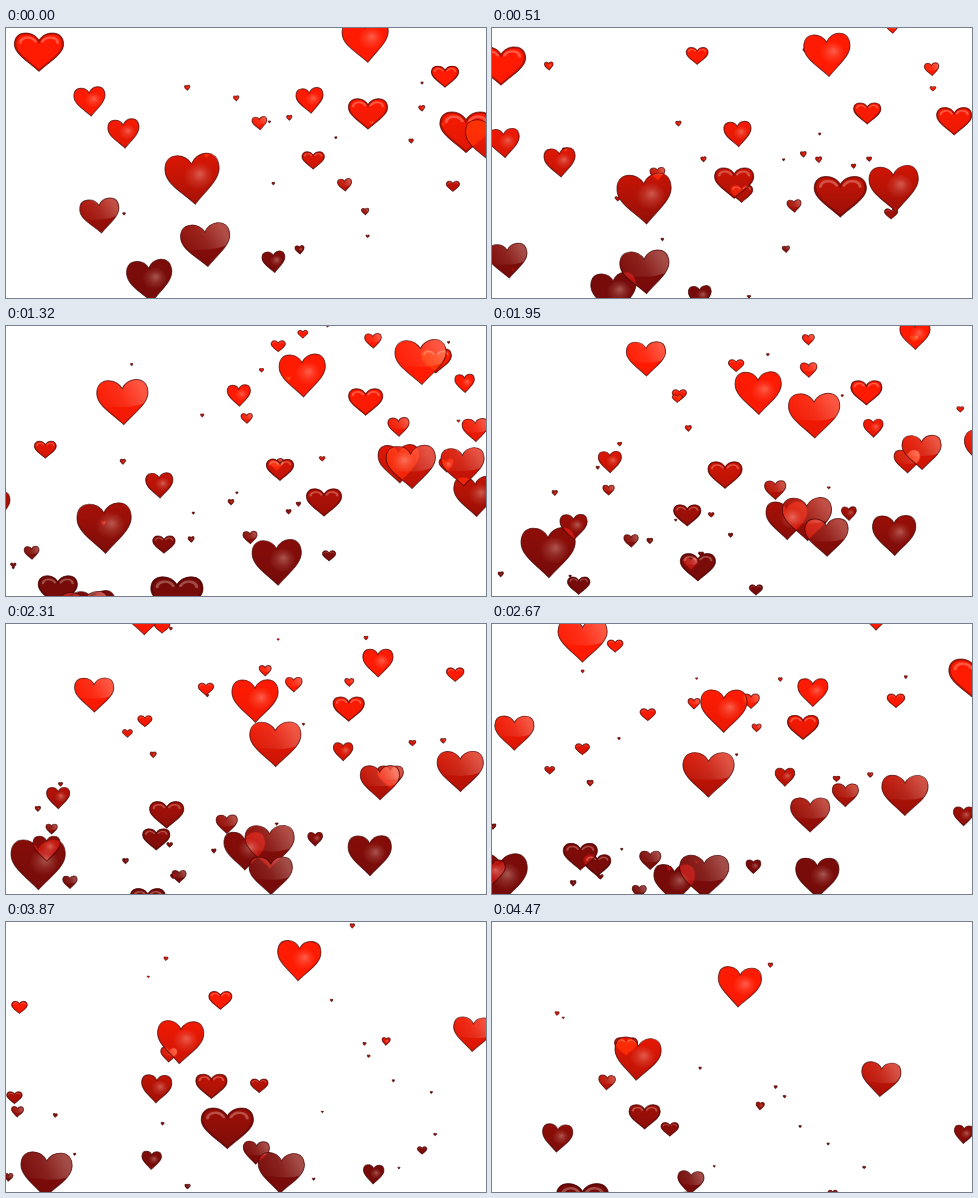
Write an HTML page with a canvas that moves like this. It is 480x270 px and loops after 4.5 s.

```html
<!DOCTYPE html>
<html lang="en">
<head>
<meta charset="utf-8">
<title>Falling hearts</title>
<style>
html, body { margin: 0; width: 100%; height: 100%; overflow: hidden; background: #fff; }
canvas { display: block; width: 480px; height: 270px; }
</style>
</head>
<body>
<canvas id="stage" width="480" height="270"></canvas>
<script>
const W = 480, H = 270, LOOP = 4500, STEP = 30;
const SLOPE = Math.tan(Math.PI / 6);
const ctx = document.getElementById('stage').getContext('2d');

// The large hearts: width, start x, start y, leftward speed in px per second.
const large = {
  rimmed: [
    [50, 33, 23, 47], [28, 439, 48, 125], [40, 362, 85, 235], [53, 460, 103, 219],
    [36, 553, 40, 178], [35, 625, -78, 201], [32, 546, -33, 88], [53, 1065, -282, 218]
  ],
  satin: [
    [47, 360, 12, 48], [55, 187, 150, 67], [32, 84, 73, 141], [32, 118, 105, 98],
    [28, 304, 72, 114], [46, 144, 252, 43], [50, 485, 112, 162], [42, 599, 18, 156],
    [44, 611, 88, 107], [31, 700, -151, 142], [44, 587, -132, 76]
  ],
  glass: [
    [40, 94, 187, 153], [50, 200, 216, 92], [52, 427, -104, 235], [52, 609, -77, 147],
    [50, 594, 31, 143], [44, 713, -8, 194], [27, 583, 38, 86], [40, 511, -174, 183],
    [40, 732, -49, 155], [47, 720, -7, 115], [50, 443, -188, 132], [40, 970, -179, 130]
  ]
};

let seed = 11;
function random(lo = 0, hi = 1) {
  seed = (seed * 16807) % 2147483647;
  return lo + (hi - lo) * seed / 2147483647;
}

// A small heart passes a random spot of the stage at a random moment.
function smallHeart() {
  const kind = ['glass', 'satin', 'rimmed'][Math.floor(random(0, 3))];
  const w = 3 + 21 * random() ** 2.5;
  const v = random(70, 220), t = random(0, LOOP / 1000);
  const x = random(0, W) + v * t;
  const y = random(0, H) - v * t * SLOPE;
  return { kind, w, x, y, v };
}

const hearts = Array.from({ length: 70 }, smallHeart);
for (const kind in large) {
  for (const [w, x, y, v] of large[kind]) hearts.push({ kind, w, x, y, v });
}

const shape = new Path2D('M0-.62C-.1-.86-.32-1-.54-1C-.85-1-1-.76-1-.42' +
  'C-1 .1-.42 .5 0 1C.42 .5 1 .1 1-.42C1-.76 .85-1 .54-1C.32-1 .1-.86 0-.62Z');
const sweep = new Path2D('M-1.1 .3C-.4-.05 .1 .5 1.1-.05L1.1-1.1L-1.1-1.1Z');
const rim = new Path2D('M-.76-.5C-.72-.82-.3-.86-.14-.56M.14-.56C.3-.86 .72-.82 .76-.5');

const tall = { satin: .92, glass: .87, rimmed: .78 };

// Bright red at the top of the stage, dark red at the bottom.
function tone(y) {
  const k = Math.min(1, Math.max(0, (y - 60) / 195));
  const s = k * k * (3 - 2 * k);
  return `rgb(${255 - 137 * s},${27 - 16 * s},${2 + 7 * s})`;
}

const white = a => `rgba(255,225,215,${a})`;

function blend(gradient, ...colors) {
  colors.forEach((c, i) => gradient.addColorStop(i / (colors.length - 1), c));
  return gradient;
}

const gloss = {
  satin() {
    ctx.fillStyle = blend(ctx.createRadialGradient(.28, -.2, 0, .22, -.1, .55),
      white(.34), white(.13), white(0));
    ctx.fillRect(-1, -1, 2, 2);
  },
  glass() {
    ctx.fillStyle = blend(ctx.createLinearGradient(-.8, .2, .8, -.5),
      white(.02), white(.1), white(.3));
    ctx.fill(sweep);
  },
  rimmed() {
    ctx.strokeStyle = 'rgba(60,0,0,.35)';
    ctx.lineWidth = .16;
    ctx.stroke(shape);
    ctx.strokeStyle = white(.3);
    ctx.lineWidth = .12;
    ctx.lineCap = 'round';
    ctx.stroke(rim);
  }
};

function drawHeart({ kind, w, x, y, v }, t) {
  const rx = w / 2 - .4, ry = rx * tall[kind];
  const cx = x - v * t, cy = y + v * t * SLOPE + rx * .05;
  if (cx < -w || cx > W + w || cy < -w || cy > H + w) return;
  ctx.save();
  ctx.translate(cx, cy);
  if (kind !== 'rimmed') ctx.rotate(.035 * t - .09);
  ctx.scale(rx, ry);
  // Overlapping hearts brighten each other.
  ctx.globalCompositeOperation = 'screen';
  ctx.fillStyle = blend(ctx.createLinearGradient(0, -1, 0, 1), tone(cy - ry), tone(cy + ry));
  ctx.fill(shape);
  ctx.globalCompositeOperation = 'source-over';
  if (w > 6) {
    ctx.save();
    ctx.clip(shape);
    gloss[kind]();
    ctx.restore();
  }
  ctx.strokeStyle = 'rgba(65,0,0,.7)';
  ctx.lineWidth = 1 / rx;
  ctx.stroke(shape);
  ctx.restore();
}

function draw(ms) {
  const t = Math.floor(ms % LOOP / STEP) * STEP / 1000;
  ctx.clearRect(0, 0, W, H);
  for (const heart of hearts) drawHeart(heart, t);
}

const start = performance.now();
function tick() {
  draw(performance.now() - start);
  requestAnimationFrame(tick);
}
tick();
</script>
</body>
</html>
```
